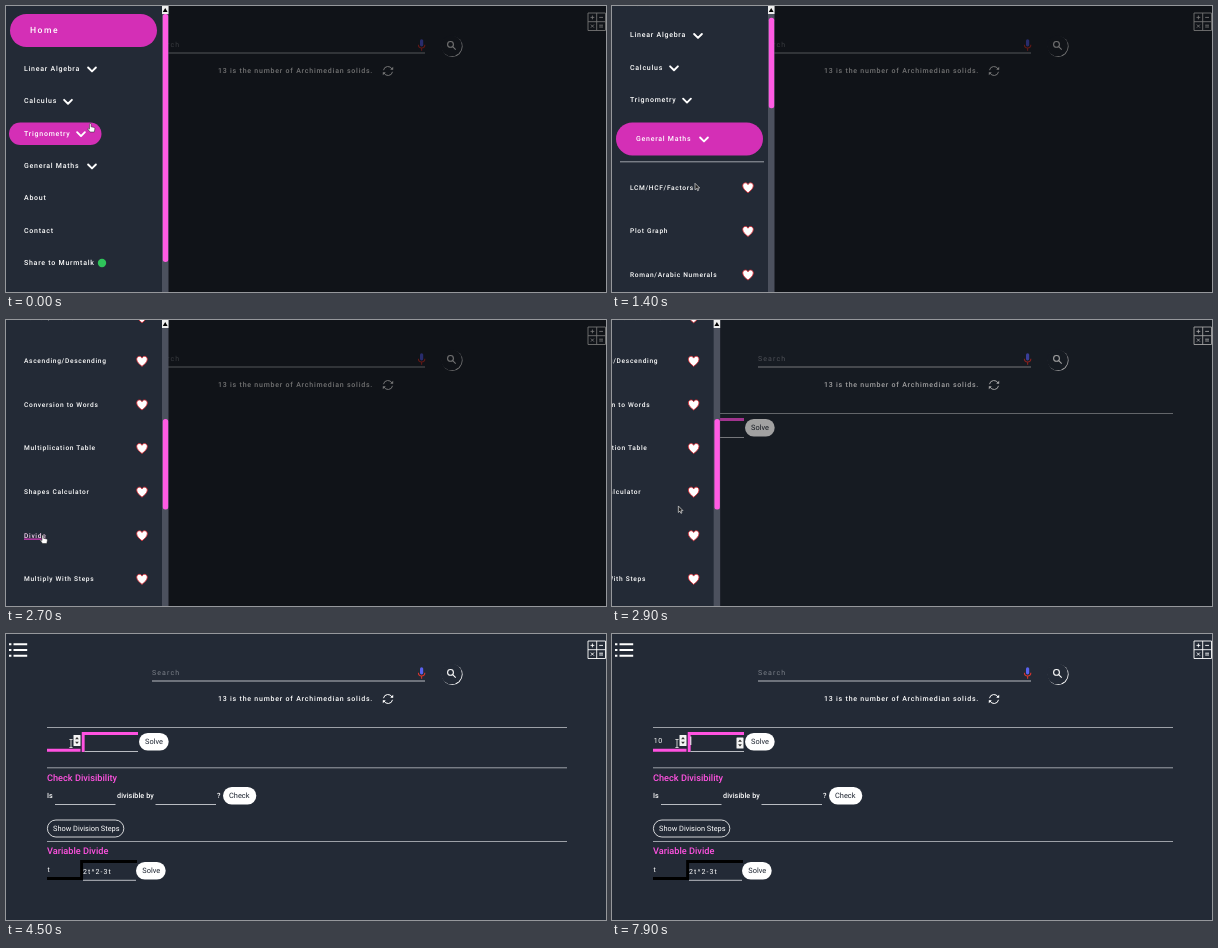
An HTML page that plays this animation: 600 px wide and 286 px high, repeating every 8 s.

```html
<!DOCTYPE html>
<html lang="en">
<head>
<meta charset="utf-8">
<title>Maths menu</title>
<style>
  html, body { margin: 0; width: 100%; height: 100%; overflow: hidden; background: #232a36; }
  svg { display: block; width: 100vw; height: 100vh; }
  text { font: 7px Roboto, Inter, sans-serif; fill: #fff; white-space: pre; text-rendering: geometricPrecision; }
  .item { font-weight: 500; letter-spacing: .75px; }
  .sub { font-size: 6.6px; font-weight: 500; letter-spacing: .7px; }
  .head { font-size: 9.2px; font-weight: 500; fill: #ff52e0; }
  .label { font-size: 7.2px; font-weight: 500; letter-spacing: .08px; }
  .btn { font-size: 7.4px; }
  .dark { fill: #1b222e; }
  .stroke { fill: none; stroke: #fff; }
  .rule { stroke: #9da1a8; }
  .field { stroke: #b9bcc2; }
</style>
</head>
<body>
<svg viewBox="0 0 600 286" xmlns="http://www.w3.org/2000/svg">
  <defs>
    <clipPath id="reveal"><rect id="revealBox" y="85" width="600" height="201"/></clipPath>
    <g id="spinner">
      <rect width="7" height="11" rx=".6" fill="#f4f4f4"/>
      <path d="M1.6 4.3 3.5 2l1.9 2.3zM1.6 6.7 3.5 9l1.9-2.3z" fill="#333"/>
    </g>
    <path id="chevron" class="stroke" stroke-width="1.9" stroke-linecap="round" stroke-linejoin="round" d="M-3.9-1.8 0 2.1 3.9-1.8"/>
    <path id="heart" d="M0 5.2C-2.3 3.2-5.3 1-5.3-1.9c0-3.2 4-4.1 5.3-1.2C1.3-6 5.3-5.1 5.3-1.9 5.3 1 2.3 3.2 0 5.2z" fill="#fff" stroke="#e0242e" stroke-width=".8"/>
  </defs>
  <rect width="600" height="286" fill="#232a36"/>

  <g id="header">
    <path stroke="#fff" stroke-width="2" d="M3 10.2h2.4M7.5 10.2h13.7M3 16h2.4M7.5 16h13.7M3 21.8h2.4M7.5 21.8h13.7"/>
    <text x="146" y="41" style="letter-spacing:1.1px;fill:#7b8089">Search</text>
    <path class="field" d="M146 47H419"/>
    <rect x="414" y="33.2" width="3.2" height="7.2" rx="1.6" fill="#5a62f0"/>
    <path d="M412.4 38.8c0 4.3 6.4 4.3 6.4 0M415.6 42v2.8" fill="none" stroke="#d8352f" stroke-width="1.1"/>
    <circle cx="446.2" cy="40.6" r="10.4" fill="#fff"/>
    <circle cx="445.5" cy="39.9" r="10.4" fill="#232a36"/>
    <g class="stroke" stroke-width="1.1">
      <circle cx="444.5" cy="38.4" r="2.9"/><path d="M446.7 40.6l3 3"/>
    </g>
    <text x="212" y="67.3" style="font-weight:500;letter-spacing:.78px">13 is the number of Archimedian solids.</text>
    <path class="stroke" stroke-width="1" d="M377.5 64.2a4.5 4.5 0 0 1 8.6-.9M386.5 65.8a4.5 4.5 0 0 1-8.6.9"/>
    <path fill="#fff" d="M384.2 63.8h3v-3zM379.8 66.2h-3v3z"/>
    <path class="stroke" stroke="#ddd" stroke-width=".9" d="M582 7h17.5v17.5H582zM590.7 7v17.5M582 15.7h17.5M584.5 11.4h3.8M586.4 9.5v3.8M593.2 11.4h3.8M584.9 18.6l3 3m0-3-3 3M593.2 19.2h3.8M593.2 21h3.8"/>
  </g>

  <g id="content" clip-path="url(#reveal)">
    <path class="rule" d="M41 93.5H561M41 133.8H561M41 207.5H561"/>
    <path fill="none" stroke="#ff52e0" stroke-width="2.9" d="M41 116.2H74.5M77.2 118V99.5H132"/>
    <path class="field" d="M78.5 117.5H132"/>
    <rect x="133" y="99" width="29.7" height="17.5" rx="8.75" fill="#fff"/>
    <text class="btn dark" x="139" y="110.2">Solve</text>
    <text class="head" x="41" y="146.7">Check Divisibility</text>
    <text class="label" x="41" y="163.5">Is</text>
    <text class="label" x="111" y="163.5">divisible by</text>
    <text class="label" x="211" y="163.5">?</text>
    <path class="field" d="M49 170.5H109.5M149.5 170.5H210"/>
    <rect x="217" y="153" width="33.3" height="17.5" rx="8.75" fill="#fff"/>
    <text class="btn dark" x="223" y="164.2">Check</text>
    <rect class="stroke" x="41.4" y="186" width="76.4" height="17" rx="8.5" stroke-width=".8"/>
    <text class="btn" x="47" y="197">Show Division Steps</text>
    <text class="head" x="41" y="220.4">Variable Divide</text>
    <path fill="none" stroke="#000" stroke-width="2.9" d="M41 244.5H75.5M75.6 246V227.5H131"/>
    <path class="field" d="M77 246.3H130"/>
    <text x="41.5" y="238">t</text>
    <text x="77" y="240.3" style="letter-spacing:1.1px">2t^2-3t</text>
    <rect x="130" y="228" width="29.7" height="17.5" rx="8.75" fill="#fff"/>
    <text class="btn dark" x="136.3" y="239.2">Solve</text>
    <text id="typed" x="41.7" y="109" style="letter-spacing:.6px"></text>
    <rect id="caret" y="102.5" width="1" height="8.5" fill="#fff"/>
    <use id="spinA" href="#spinner" x="67.5" y="101"/>
    <use id="spinB" href="#spinner" x="124.5" y="103.5"/>
  </g>

  <rect id="shade" width="600" height="286"/>
  <g id="menu">
    <rect width="162" height="286" fill="#232a36"/>
    <g id="items"></g>
    <rect x="156" width="6.5" height="286" fill="#4c515e"/>
    <rect x="156" width="6.5" height="8" fill="#eee"/>
    <path d="M156.8 6 159.2 2l2.4 4z"/>
    <rect id="thumb" x="156.8" width="5.4" rx="2.5" fill="#ff5be3"/>
  </g>

  <g id="cursor" stroke-linejoin="round">
    <path id="arrow" d="M0 .3V6.8L1.6 5.5 2.6 7.7l1-.4-.9-2.3h2z" fill="#222" stroke="#ddd" stroke-width=".7"/>
    <path id="hand" d="M0-3.6c0-1.2 1.6-1.2 1.6 0v2.4l3 .6q1 .3.8 1.4L4.8 4H.5L-1.8.8q.2-1.1 1.8.3z" fill="#fff" stroke="#222" stroke-width=".5"/>
    <path id="beam" d="M-1.6-4h3.2M0-4v8M-1.6 4h3.2" fill="none" stroke="#ddd" stroke-width=".9"/>
  </g>
</svg>
<script>
const LOOP = 8000, STEP = 100, PINK = '#d42fb6';
const $ = id => document.getElementById(id);
const clamp = v => Math.max(0, Math.min(1, v));
const mix = (a, b, k) => a + (b - a) * k;
const ease = k => k * k * (3 - 2 * k);
const ramp = (t, a, b) => ease(clamp((t - a) / (b - a)));
const show = (node, on) => node.setAttribute('visibility', on ? 'visible' : 'hidden');

function set(node, attrs) {
  for (const k in attrs) node.setAttribute(k, attrs[k]);
  return node;
}
function add(tag, attrs, label) {
  const node = set(document.createElementNS('http://www.w3.org/2000/svg', tag), attrs);
  if (label) node.textContent = label;
  return $('items').appendChild(node);
}
// Linear interpolation through [time, ...values] keys.
function track(keys, t) {
  const i = keys.findIndex(k => k[0] > t);
  if (i < 0) return keys[keys.length - 1].slice(1);
  if (i === 0) return keys[0].slice(1);
  const a = keys[i - 1], b = keys[i], k = (t - a[0]) / (b[0] - a[0]);
  return a.slice(1).map((v, n) => mix(v, b[n + 1], k));
}

const pill = () => add('rect', { fill: PINK });
const homePill = pill(), trigPill = pill(), mathsPill = pill();
const home = add('text', { class: 'item' }, 'Home');
const tops = [['Linear Algebra', 86], ['Calculus', 62], ['Trignometry', 75], ['General Maths', 86]].map(([name, x]) => ({
  x, text: add('text', { class: 'item' }, name), mark: add('use', { href: '#chevron' })
}));
const rule = add('path', { class: 'rule' });
const subs = ['LCM/HCF/Factors', 'Plot Graph', 'Roman/Arabic Numerals', 'Ascending/Descending',
  'Conversion to Words', 'Multiplication Table', 'Shapes Calculator', 'Divide', 'Multiply With Steps']
  .map(name => ({
    text: add('text', { class: 'sub', x: 18 }, name),
    heart: add('use', { href: '#heart', x: 136 }),
    line: add('path', { stroke: '#ff3fdc', 'stroke-width': 1 })
  }));
const lows = ['About', 'Contact', 'Share to Murmtalk'].map(name => add('text', { class: 'item', x: 18 }, name));
const badge = add('circle', { cx: 96, r: 4.2, fill: '#2fc45a' });

const scrollKeys = [[1300, 0], [1400, 12], [1500, 44], [1600, 112], [1700, 186], [1800, 235],
  [1900, 261.5], [2000, 274], [2100, 281], [2200, 283.3]];
const cursorKeys = [[0, 83.5, 122], [100, 84, 126], [300, 85, 146], [500, 86, 155], [700, 86, 158], [900, 86, 158],
  [1200, 84, 170], [1400, 83, 177], [1700, 84, 181], [1900, 84.5, 205], [2100, 80, 207], [2600, 37, 218], [2700, 36, 219.5],
  [2800, 36, 219.5], [3100, 127, 118], [3200, 125, 117], [3700, 64, 109], [3800, 64, 109], [3900, 65, 109.5]];
const clipKeys = [[2800, 0], [2900, 40], [3000, 95], [3100, 134], [3200, 165], [3400, 201]];

function placePill(node, x, y, w, h, opacity) {
  set(node, { x, y: y - h / 2, width: w, height: h, rx: h / 2, opacity });
}

function drawMenu(t) {
  const open = ramp(t, 900, 1300), scroll = track(scrollKeys, t)[0];
  const first = 62.5 - 21.5 * open - scroll;
  const homeY = 24.5 - 15.5 * open - scroll;
  const mathsY = first + 97 + 6.5 * open;
  const lowY = mathsY + 32.3 + 620 * open;

  placePill(homePill, 4, homeY, 147, mix(33, 22, open), 1 - open);
  set(home, { x: mix(24, 18, open), y: homeY + 2.8, style: `font-size:${mix(8.6, 7, open)}px;letter-spacing:${mix(1.5, .75, open)}px` });
  placePill(trigPill, 3, first + 65.2, 92.5, 22.5, 1 - ramp(t, 100, 400));
  placePill(mathsPill, mix(3, 4, open), mathsY + .4, mix(103, 147, open), mix(22.5, 33, open), ramp(t, 200, 600));

  tops.forEach(({ x, text, mark }, i) => {
    const last = i === 3, y = last ? mathsY : first + 32.35 * i, dx = last ? 6 * open : 0;
    set(text, { x: 18 + dx, y: y + 2.4 });
    set(mark, { x: x + dx, y: y + .8 });
  });

  set(rule, { d: `M8 ${mathsY + 23.3}H152`, opacity: open });
  const hover = t >= 1700 && t < 2000 ? 4 : t >= 2000 && t < 2300 ? 6 : t >= 2300 ? 7 : -1;
  subs.forEach(({ text, heart, line }, i) => {
    const y = mathsY + 48.7 + 43.6 * i, seen = open > 0 && y < lowY - 18, hot = seen && i === hover;
    set(text, { y: y + 2.4, style: hot ? 'fill:#ffd8f7' : '' });
    set(heart, { y: y + .5 });
    show(text, seen);
    show(heart, seen);
    show(line, hot);
    if (hot) line.setAttribute('d', `M18 ${y + 4}h${text.getComputedTextLength() - .7}`);
  });

  lows.forEach((node, i) => node.setAttribute('y', lowY + 32.35 * i + 2.4));
  badge.setAttribute('cy', lowY + 65.2);
  set($('thumb'), { y: 8 + scroll * .321, height: mix(248, 90.5, open) });
}

function drawPage(t) {
  const leave = clamp((t - 2800) / 300);
  // Hidden by display, since the items carry their own visibility.
  $('menu').setAttribute('display', leave < 1 ? 'inline' : 'none');
  $('menu').setAttribute('transform', `translate(${-163 * leave})`);
  $('shade').setAttribute('opacity', .55 * (1 - leave));
  $('revealBox').setAttribute('height', track(clipKeys, t)[0]);
  show($('content'), t >= 2900);

  const second = t >= 6700;
  $('typed').textContent = '10'.slice(0, t < 6200 ? 0 : t < 6300 ? 1 : 2);
  const blink = start => t >= start && Math.floor((t - start) / 600) % 2 === 0;
  const caretOn = second ? blink(6700) : t >= 6200 || blink(3900);
  $('caret').setAttribute('x', second ? 78.3 : t >= 6300 ? 50.8 : t >= 6200 ? 46.5 : 41.5);
  show($('caret'), caretOn);
  show($('spinA'), t >= 3600);
  show($('spinB'), second);
}

function drawCursor(t) {
  const [x, y] = track(cursorKeys, t);
  $('cursor').setAttribute('transform', `translate(${x} ${y})`);
  const kind = t >= 3600 ? 'beam' : t >= 2900 || (t >= 1200 && t < 1700) ? 'arrow' : 'hand';
  for (const id of ['arrow', 'hand', 'beam']) show($(id), id === kind);
}

function frame(now) {
  const t = Math.floor((now % LOOP) / STEP) * STEP;
  drawMenu(t);
  drawPage(t);
  drawCursor(t);
  requestAnimationFrame(frame);
}
frame(0);
</script>
</body>
</html>
```
